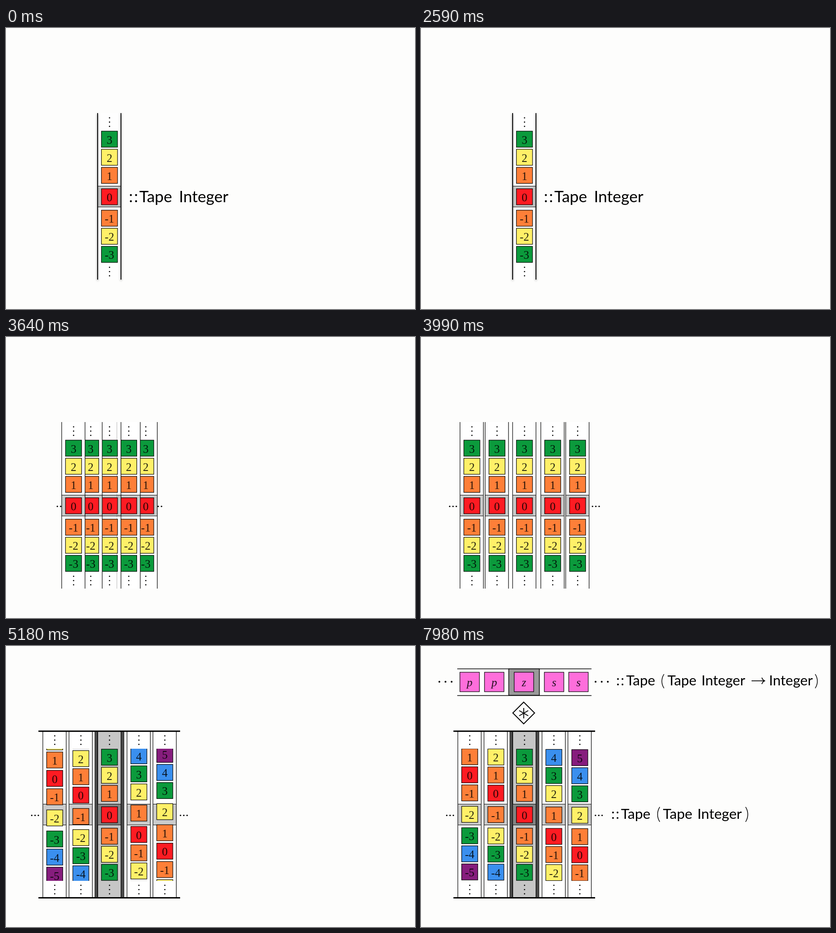
Animation of 902 by 621 pixels, one loop 8 s. Source, as an HTML page with a canvas:

```html
<!DOCTYPE html>
<html lang="en">
<head>
<meta charset="utf-8">
<title>Tapes</title>
<style>
html, body { margin: 0; width: 100%; height: 100%; overflow: hidden; background: #fdfdfc; }
canvas { display: block; }
</style>
</head>
<body>
<canvas id="stage" width="902" height="621"></canvas>
<script>
const ctx = document.getElementById('stage').getContext('2d');
const LOOP = 8000, STEP = 70;
const MOVE = 1275, SPREAD = 2868, ROLL = 4140;
const MID_X = 227.8, MID_Y = 373, TOP = 188, BOTTOM = 556;
const TAPE_W = 51.5, CELL = 35.5;
const OFFSETS = [-120.8, -63.1, 0, 64.8, 122];
const COLORS = ['#fe1b22', '#fe7f38', '#fff068', '#0b9a3c', '#3a8fee', '#861d7d'];
const INK = 'rgba(0,0,0,.86)';
const SANS = 'Lato, "Open Sans", sans-serif';
const SERIF = '"Liberation Serif", "Noto Serif", serif';

const clamp = v => Math.min(1, Math.max(0, v));
const ramp = (t, start, end) => clamp((t - start) / (end - start));
const ease = u => u * u * (3 - 2 * u);
const mix = (a, b, p) => a + (b - a) * p;

function rect(x, y, w, h, fill, line = 0) {
  ctx.fillStyle = fill;
  ctx.fillRect(x, y, w, h);
  if (line) {
    ctx.strokeStyle = '#000';
    ctx.lineWidth = line;
    ctx.strokeRect(x, y, w, h);
  }
}

function path(points, width, close = false) {
  ctx.beginPath();
  points.forEach(([x, y]) => ctx.lineTo(x, y));
  if (close) ctx.closePath();
  ctx.strokeStyle = '#000';
  ctx.lineWidth = width;
  ctx.stroke();
}

function dots(x, y, dx, dy, r) {
  ctx.fillStyle = '#000';
  for (let i = -1; i <= 1; i++) {
    ctx.beginPath();
    ctx.arc(x + i * dx, y + i * dy, r, 0, Math.PI * 2);
    ctx.fill();
  }
}

function faded(alpha, draw) {
  if (alpha <= 0) return;
  ctx.save();
  ctx.globalAlpha = alpha;
  draw();
  ctx.restore();
}

// Each word is [text, x] on a common baseline; parentheses are taller and thinner.
function label(words, y, size) {
  ctx.textAlign = 'left';
  ctx.fillStyle = '#000';
  for (const [text, x] of words) {
    const paren = text === '(' || text === ')';
    ctx.font = paren ? `300 ${size * 1.16}px ${SANS}` : `${size}px ${SANS}`;
    ctx.fillText(text, x, paren ? y + 1.5 : y);
  }
}

function box(x, y, size, fill, text, font, drop) {
  rect(x - size / 2, y - size / 2, size, size, fill, 1.2);
  ctx.font = font;
  ctx.textAlign = 'center';
  ctx.fillStyle = INK;
  ctx.fillText(text, x, y + drop);
}

// The centre slot has extra room above and below it.
const slotY = slot => MID_Y - 40 * slot - 7.3 * Math.sign(slot);

function tape(k, spread, roll, mark, shadow) {
  const x = MID_X + OFFSETS[k + 2] * spread;
  const left = x - TAPE_W / 2, right = x + TAPE_W / 2;
  const middle = k === 0;

  rect(left, TOP, TAPE_W, BOTTOM - TOP, middle ? 'rgba(255,255,255,.75)' : '#fff');
  if (middle) {
    faded(mark, () => {
      rect(left, TOP, TAPE_W, BOTTOM - TOP, '#c6c6c6');
      for (const bar of [left - 6, right]) rect(bar, TOP, 6.5, BOTTOM - TOP, '#4b4b4b', 1);
    });
  }
  rect(left, 349.5, TAPE_W, 46, middle ? 'rgba(110,110,110,.38)' : '#cbcbcb');
  if (middle) faded(mark, () => rect(left, 349.5, TAPE_W, 46, '#838383'));
  for (const y of [349.5, 395.5]) path([[left, y], [right, y]], 1.2);

  ctx.save();
  ctx.shadowColor = `rgba(0,0,0,${0.5 * shadow})`;
  ctx.shadowBlur = 4 * shadow;
  ctx.shadowOffsetY = 2 * shadow;
  for (const edge of [left, right]) path([[edge, TOP], [edge, BOTTOM]], 1.2 + 0.7 * shadow);
  ctx.restore();

  dots(x + 0.5, 208, 0, 9.4, 1.4);
  dots(x + 0.5, 538.3, 0, 9.4, 1.4);

  ctx.save();
  ctx.beginPath();
  ctx.rect(left, 227, TAPE_W, 292);
  ctx.clip();
  for (let v = -6; v <= 6; v++) {
    const y = mix(slotY(v), slotY(v - k) + 0.5 * k, roll);
    if (y < 205 || y > 541) continue;
    box(x + 0.4, y, CELL, COLORS[Math.abs(v)] || COLORS[5], String(v), `25px ${SERIF}`, 10);
  }
  ctx.restore();
}

function grid(t) {
  const spread = ease(ramp(t, SPREAD, SPREAD + MOVE));
  const roll = ease(ramp(t, ROLL, ROLL + MOVE));
  const mark = ramp(t, ROLL + 150, ROLL + 900);
  const shadow = 1 - ramp(t, SPREAD, SPREAD + 250);

  if (t >= SPREAD) {
    for (const side of [-1, 1]) dots(MID_X + 0.3 + side * 164 * spread, 374.3, 7.3, 0, 1.6);
    for (let k = 2; k >= -2; k--) tape(k, spread, roll, mark, shadow);
  } else {
    tape(0, 0, 0, 0, shadow);
  }
  faded(mark, () => {
    for (const y of [188.3, 556.6]) path([[71.5, y], [384, y]], 3);
  });
}

function functionRow() {
  rect(80, 50.5, 296, 59, '#fff');
  for (const y of [50.5, 109.5]) path([[80, y], [376, y]], 1.5);
  rect(193.5, 50.5, 67.5, 58.5, '#9a9a9a', 1.5);
  [...'ppzss'].forEach((name, i) => {
    const x = [107.3, 161.5, 227, 293.5, 347.3][i];
    box(x, 79.5, 43, '#fe6edb', name, `italic 25px ${SERIF}`, 9);
  });
  dots(54, 79, 13.5, 0, 2);
  dots(398.5, 79, 13.5, 0, 2);

  path([[226.5, 124], [250.5, 148], [226.5, 172], [202.5, 148]], 2, true);
  for (let i = 0; i < 3; i++) {
    const a = Math.PI / 2 + i * Math.PI / 3;
    const dx = 11.5 * Math.cos(a), dy = 11.5 * Math.sin(a);
    path([[226.5 - dx, 148.5 - dy], [226.5 + dx, 148.5 + dy]], 2);
  }

  label([[':', 430.5], [':', 440.5], ['Tape', 452.5], ['(', 528.5], ['Tape', 543.5],
    ['Integer', 618.5], ['Integer', 767.5], [')', 867.5]], 87, 31);
  path([[729, 77], [758, 77]], 1.7);
  path([[751.5, 70], [754, 74.5], [758, 77], [754, 79.5], [751.5, 84]], 1.7);
}

function draw(t) {
  rect(0, 0, 902, 621, '#fdfdfc');
  grid(t);
  faded(1 - ramp(t, SPREAD - 70, SPREAD + 230), () =>
    label([[':', 271], [':', 282.5], ['Tape', 294], ['Integer', 381.5]], 384.5, 35));
  faded(ramp(t, 5500, 6050), () =>
    label([[':', 419.5], [':', 429.5], ['Tape', 441], ['(', 519], ['Tape', 533.5],
      ['Integer', 609.5], [')', 714]], 382, 31.5));
  faded(ramp(t, 6950, 7600), functionRow);
}

ctx.lineJoin = 'miter';
const begin = performance.now();
function tick() {
  const t = (performance.now() - begin) % LOOP;
  draw(Math.floor(t / STEP) * STEP);
  requestAnimationFrame(tick);
}
tick();
</script>
</body>
</html>
```
